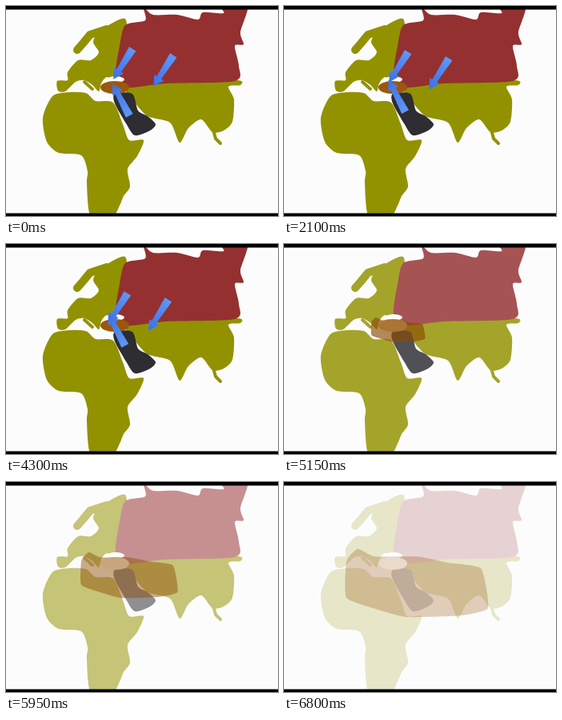
An HTML page with a canvas for the animation above (6850 ms loop, 340 by 263 pixels).

```html
<!DOCTYPE html>
<html lang="en">
<head>
<meta charset="utf-8">
<title>Map with spreading region</title>
<style>
html, body { margin: 0; width: 100%; height: 100%; overflow: hidden; background: #fdfcfd; }
canvas { display: block; }
</style>
</head>
<body>
<canvas id="stage" width="340" height="263"></canvas>
<script>
const ctx = document.getElementById('stage').getContext('2d');
const LOOP = 6850, FADE_START = 4700, SPREAD_TIME = 2100, PULSE = 770;
const PAPER = [253, 252, 253], OLIVE = [146, 146, 0], RED = [148, 48, 48];
const BLACK = [45, 45, 50], BROWN = [155, 88, 12];

const mix = (a, b, k) => a + (b - a) * k;
const clamp = x => Math.max(0, Math.min(1, x));
const points = text => text.split(' ').map(p => p.split(',').map(Number));

// Closed smooth curve through a few key points
function coast(pts, bend = 0.13) {
  const path = new Path2D(), n = pts.length;
  const at = i => pts[(i + n) % n];
  const handle = (i, side) => at(i).map((v, c) => v + side * bend * (at(i + 1)[c] - at(i - 1)[c]));
  path.moveTo(...pts[0]);
  pts.forEach((_, i) => path.bezierCurveTo(...handle(i, 1), ...handle(i + 1, -1), ...at(i + 1)));
  return path;
}

function ellipse(x, y, rx, ry) {
  const path = new Path2D();
  path.ellipse(x, y, rx, ry, 0, 0, 2 * Math.PI);
  return path;
}

const land = (color, text) => ({ color, path: coast(points(text)) });
const strip = (width, text) => ({ color: OLIVE, width, path: new Path2D('M' + text) });

const parts = [
  // Europe with its northern and southern peninsulas
  land(OLIVE, '64,94 77,93 77,83 90,68 106,68 116,58 109,45 118,31 149,16 150,60 140,93 126,89 119,97 116,107 108,99 98,93 87,95 74,107 65,106'),
  strip(10, '89,55 96,47 105,36 126,29'),
  strip(4, '98,95 108,104'),
  // Africa
  land(OLIVE, '58,113 78,108 100,109 112,119 134,121 146,148 154,168 172,168 164,188 152,204 155,226 147,238 142,250 133,264 106,264 101,222 102,207 94,187 66,184 51,170 46,140'),
  // Asia
  land(OLIVE, '148,97 200,96 288,93 293,99 278,101 285,117 283,145 272,156 258,158 244,142 228,153 217,171 205,146 177,138 160,120 152,110'),
  strip(4, '259,155 262,166 268,172'),
  land(RED, '149,24 174,18 172,2 184,11 214,11 240,17 246,8 272,9 268,-2 302,-2 293,33 297,48 286,50 291,75 286,94 200,97 152,102 137,88 142,50'),
  land(BLACK, '136,110 158,110 165,131 177,138 187,148 180,156 161,162 150,147 136,122'),
  { color: PAPER, path: ellipse(137, 92, 11, 4) }
];
const heartland = { color: BROWN, path: ellipse(136, 102, 18, 8) };

// Spreading region in units of its own growing box
const spreadShape = points('0,.2 .08,.02 .2,.13 .5,.13 .72,.22 .95,.3 1,.87 .8,.98 .42,1 .2,.88 0,.72');

function spreadAt(p) {
  const left = 118 - 40 * p, right = 155 + 100 * p;
  const top = 94 - 12 * p, bottom = 110 + 59 * p;
  return coast(spreadShape.map(([u, v]) => [mix(left, right, u), mix(top, bottom, v)]), 0.08);
}

// Resting tip, tail and travel of each arrow
const arrows = [
  { tip: [134, 92], tail: [158, 54], move: [-7, 9] },
  { tip: [184, 101], tail: [209, 62], move: [-7, 9] },
  { tip: [133, 97], tail: [154, 137], move: [-6, -11] }
];

function drawArrow({ tip, tail, move }, k) {
  const dx = tail[0] - tip[0], dy = tail[1] - tip[1], len = Math.hypot(dx, dy);
  ctx.save();
  ctx.translate(tip[0] + move[0] * k, tip[1] + move[1] * k);
  ctx.rotate(Math.atan2(dy, dx));
  const shade = ctx.createLinearGradient(0, 0, len, 0);
  shade.addColorStop(0, '#3a70e8');
  shade.addColorStop(1, '#5f97f6');
  ctx.fillStyle = shade;
  ctx.beginPath();
  ctx.moveTo(0, 0);
  for (const side of [1, -1]) {
    const edge = [[13, 7], [13, 3.2], [len, 5]];
    if (side < 0) edge.reverse();
    edge.forEach(([x, y]) => ctx.lineTo(x, side * y));
  }
  ctx.fill();
  ctx.restore();
}

function draw(t) {
  const fade = clamp((t - FADE_START) / 2650);
  const tint = color => `rgb(${color.map((v, i) => Math.round(mix(v, PAPER[i], fade)))})`;
  const paint = ({ color, path, width }) => {
    ctx.fillStyle = ctx.strokeStyle = tint(color);
    ctx.lineWidth = width;
    if (width) ctx.stroke(path); else ctx.fill(path);
  };

  ctx.fillStyle = tint(PAPER);
  ctx.fillRect(0, 0, 340, 263);
  ctx.lineCap = ctx.lineJoin = 'round';
  parts.forEach(paint);

  if (t > FADE_START) {
    const p = (t - FADE_START) / SPREAD_TIME;
    ctx.globalAlpha = mix(0.75, 0.27, p);
    ctx.fillStyle = 'rgb(140,75,0)';
    ctx.fill(spreadAt(p));
    ctx.globalAlpha = 1;
  }
  paint(heartland);

  ctx.globalAlpha = 1 - clamp((t - 4500) / 300);
  const push = 0.5 - 0.56 * Math.cos(2 * Math.PI * (t / PULSE + 0.05));
  arrows.forEach(a => drawArrow(a, push));
  ctx.globalAlpha = 1;

  // Bars with a half-dark inner edge
  ctx.fillStyle = '#000';
  ctx.fillRect(0, 0, 340, 4.5);
  ctx.fillRect(0, 259.5, 340, 4);
}

const start = performance.now();
function tick() {
  draw((performance.now() - start) % LOOP);
  requestAnimationFrame(tick);
}
tick();
</script>
</body>
</html>
```
